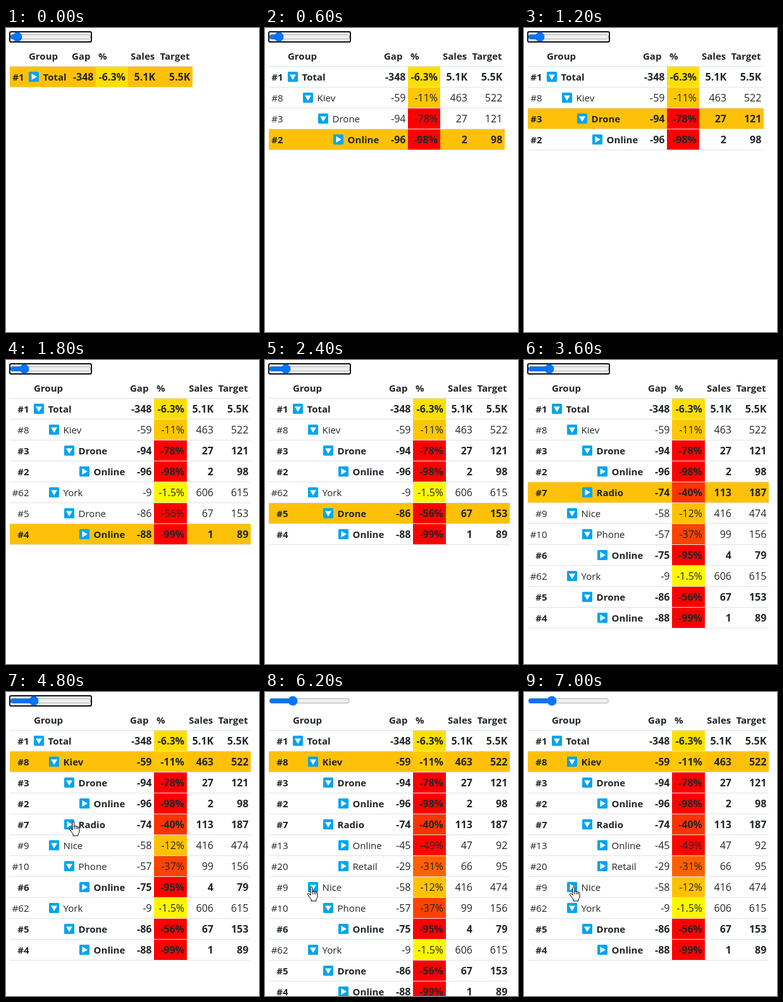
Write an HTML page that moves like this. It is 400x480 px and loops after 8000 ms.

```html
<!DOCTYPE html>
<html lang="en">
<head>
<meta charset="utf-8">
<title>Top gaps tree</title>
<style>
html, body { margin: 0; width: 100%; height: 100%; overflow: hidden; background: #fff; }
svg { position: absolute; left: 0; top: 0; font: 15px "Open Sans", "Noto Sans", sans-serif; fill: #212529; }
input { position: absolute; left: 6px; top: 6px; width: 129px; height: 16px; margin: 0; pointer-events: none; }
.bold { font-weight: 700; }
.num { font-size: 16px; text-anchor: end; }
.rank { text-anchor: end; }
.ring { fill: none; stroke: #101010; stroke-width: 2; }
.hand { fill: #fff; stroke: #000; stroke-linejoin: round; }
</style>
</head>
<body>
<svg width="400" height="480"></svg>
<input type="range" min="0" max="30" value="1" tabindex="-1">
<script>
const LOOP = 8000, STEP = 600, ROW = 33, TOP = 61;
const svg = document.querySelector('svg'), slider = document.querySelector('input');

// level, name, rank, slider value that reveals it, gap, %, sales, target, parent toggle
const rows = [
  [0, 'Total', 1, 1, -348, 6.3, '5.1K', '5.5K'],
  [1, 'Kiev', 8, 2, -59, 11, 463, 522],
  [2, 'Drone', 3, 2, -94, 78, 27, 121],
  [3, 'Online', 2, 2, -96, 98, 2, 98],
  [2, 'Radio', 7, 7, -74, 40, 113, 187],
  [3, 'Online', 13, 8, -45, 49, 47, 92, 'radio'],
  [3, 'Retail', 20, 8, -29, 31, 66, 95, 'radio'],
  [1, 'Nice', 9, 6, -58, 12, 416, 474],
  [2, 'Phone', 10, 6, -57, 37, 99, 156, 'nice'],
  [3, 'Online', 6, 6, -75, 95, 4, 79, 'nice'],
  [1, 'York', 62, 4, -9, 1.5, 606, 615],
  [2, 'Drone', 5, 4, -86, 56, 67, 153],
  [3, 'Online', 4, 4, -88, 99, 1, 89]
];

const rect = (x, y, w, h, fill, rx = 0) =>
  `<rect x="${x}" y="${y}" width="${w}" height="${h}" rx="${rx}" fill="${fill}"/>`;
const ring = (x, y, w, h) =>
  `<rect class="ring" x="${x}" y="${y}" width="${w}" height="${h}" rx="2"/>`;
const text = (x, y, s, cls = '') => `<text x="${x}" y="${y}" class="${cls}">${s}</text>`;

const icon = (x, y, open) => rect(x, y, 16, 16, '#00a4ef', 1.5) +
  `<path fill="#fff" transform="translate(${x + 8} ${y + 8}) rotate(${open ? 90 : 0})" d="M-3.5-5L5 0L-3.5 5Z"/>`;

const hand = (x, y) => `<g class="hand" transform="translate(${x} ${y})">
  <path d="M5.5 14V2.5Q5.5 .8 7 .8T8.5 2.5V8.5Q8.7 7.3 10 7.4T11.5 8.8Q11.7 8 12.8 8.1T14 9.6Q14.3 9 15.2 9.2T16.5 10.8V16Q16.5 18.5 14.5 20V23H6.5V20Q4 17.5 1 13Q.4 11.6 1.6 11.2T4 12.2Z"/>
  <path d="M8.5 8V12.5M11.5 8.8V12.5M14 9.6V12.5"/></g>`;

function draw(t) {
  const n = Math.min(8, 1 + Math.floor(t / STEP));
  const open = { radio: t >= 5400, nice: t < 6800 };
  const shown = rows.filter(r => n >= r[3] && (!r[8] || open[r[8]]));
  const left = n > 3 ? 44 : 36;
  const shift = n > 3 ? 92 : n > 1 ? 84 : 0;
  const pctX = 142 + shift, pctW = n > 3 ? 52 : 51, right = 295 + shift;

  let out = rect(6, 60, right - 6, 1, '#dee2e6');
  const heads = [[left, 'Group'], [104 + shift, 'Gap'], [146 + shift, '%'], [197 + shift, 'Sales'], [243.5 + shift, 'Target']];
  for (const [x, s] of heads) out += text(x, 50, s, 'bold');

  shown.forEach(([level, name, rank, , gap, pct, sales, target], i) => {
    const y = TOP + i * ROW, base = y + 22, x = left + level * 24;
    const bold = rank <= n ? ' bold' : '';
    const hasKids = i + 1 < shown.length && shown[i + 1][0] > level;
    const green = Math.max(0, Math.round(255 * (1 - pct / 50)));
    if (rank === n) out += rect(6, y, right - 6, ROW - 1, '#ffc107');
    out += rect(pctX, y, pctW, ROW - 1, `rgb(255,${green},0)`) +
      rect(6, y + ROW - 1, right - 6, 1, '#dee2e6') +
      text(left - 7.5, base, '#' + rank, 'rank' + bold) +
      icon(x, y + 8, hasKids) +
      text(x + 22.6, base, name, bold) +
      text(138.5 + shift, base, gap, 'num' + bold) +
      text(pctX + pctW - 4, base, `-${pct}%`, 'num' + bold) +
      text(236 + shift, base, sales, 'num' + bold) +
      text(291.3 + shift, base, target, 'num' + bold);
  });

  if (t < 5400) out += ring(6, 6, 129, 16);
  else if (t < 5600) out += ring(90, 199, 20, 20);
  else if (t >= 6800 && t < 7000) out += ring(66, 298, 20, 20);

  if (t >= 6800) out += hand(71.5, 307);
  else if (t >= 6200) out += hand(66.5, 307);
  else if (t >= 4800) out += hand(99.5, 204);

  slider.value = n;
  svg.innerHTML = out;
}

const cuts = [600, 1200, 1800, 2400, 3000, 3600, 4200, 4800, 5400, 5600, 6200, 6800, 7000];
let last = -1;
function tick() {
  const t = performance.now() % LOOP;
  const phase = cuts.filter(c => c <= t).length;
  if (phase !== last) draw(t);
  last = phase;
  requestAnimationFrame(tick);
}
tick();
</script>
</body>
</html>
```
